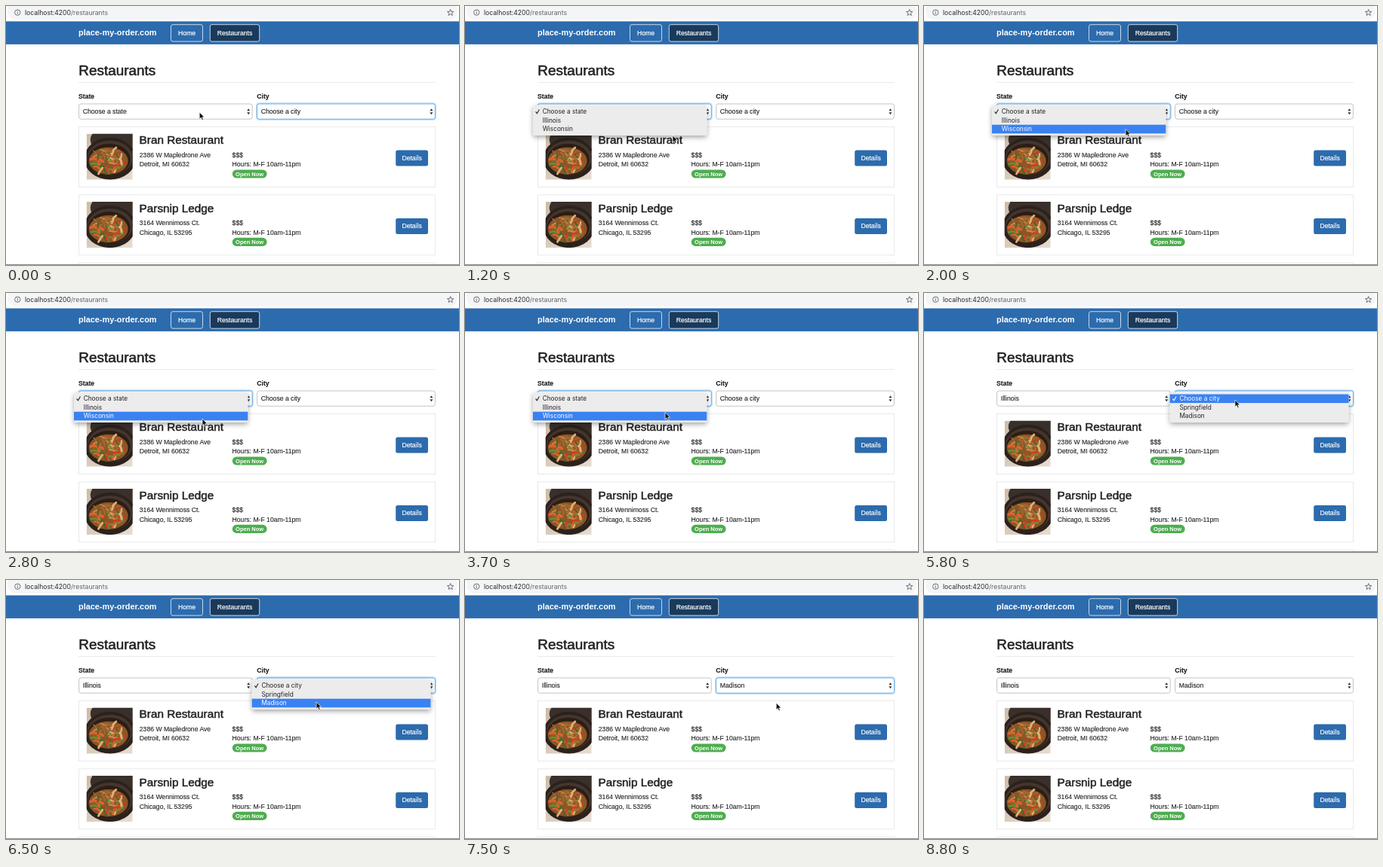
Recreate the animation shown at these times as an HTML page. Size 600x344 px, loop 8900 ms.

```html
<!DOCTYPE html>
<html lang="en">
<head>
<meta charset="utf-8">
<title>Restaurants</title>
<style>
  html, body { margin: 0; width: 100%; height: 100%; overflow: hidden; background: #fff; }
  svg { display: block; width: 100vw; height: 100vh; }
  text { font: 8.65px "Liberation Sans", Arial, sans-serif; fill: #222; stroke: #222; stroke-width: .12px; white-space: pre; }
  .ui { font: 8.25px Inter, sans-serif; stroke: none; }
  .url { font: 8.62px Inter, sans-serif; fill: #5f6368; stroke: none; }
  .host { fill: #26282b; }
  .bold { font-weight: 700; fill: #1c1c1c; }
  .brand { font-size: 10.9px; font-weight: 700; fill: #fff; stroke: none; }
  .title { font-size: 18.9px; stroke-width: .55px; }
  .name { font-size: 15.3px; stroke-width: .5px; }
  .btn { fill: #fff; stroke: #fff; stroke-width: .2px; text-anchor: middle; }
  .badge { font-size: 7.5px; font-weight: 700; fill: #fff; stroke: none; text-anchor: middle; }
</style>
</head>
<body>
<svg id="stage" viewBox="0 0 600 344" preserveAspectRatio="none">
  <defs>
    <linearGradient id="table" x1="0" y1="0" x2="1" y2="1">
      <stop offset="0" stop-color="#cdbba6"/><stop offset="1" stop-color="#e6dcd0"/>
    </linearGradient>
    <filter id="shadow" x="-10%" y="-30%" width="120%" height="180%">
      <feDropShadow dx="0" dy="2.5" stdDeviation="3.4" flood-color="#000" flood-opacity=".35"/>
    </filter>
    <clipPath id="crop"><rect width="61" height="61"/></clipPath>
    <g id="dish" clip-path="url(#crop)"></g>
  </defs>
</svg>
<script>
const NS = 'http://www.w3.org/2000/svg';
const stage = document.getElementById('stage');
const LOOP = 8900;

function add(parent, tag, attrs = {}, label) {
  const el = document.createElementNS(NS, tag);
  for (const k in attrs) el.setAttribute(k, attrs[k]);
  if (label !== undefined) el.textContent = label;
  return parent.appendChild(el);
}
const text = (parent, x, y, label, cls = '') => add(parent, 'text', { x, y, class: cls }, label);
const rect = (parent, x, y, width, height, fill, more) =>
  add(parent, 'rect', { x, y, width, height, fill, ...more });
const show = (el, on) => el.setAttribute('visibility', on ? 'visible' : 'hidden');

function drawDish() {
  const g = document.getElementById('dish');
  let seed = 11;
  const rnd = (a, b) => {
    seed = (seed * 16807) % 2147483647;
    return a + (b - a) * seed / 2147483647;
  };
  const oval = (cx, cy, rx, ry, fill) => add(g, 'ellipse', { cx, cy, rx, ry, fill });
  rect(g, 0, 0, 61, 61, 'url(#table)');
  oval(38, 8, 33, 20, '#3a302b');
  oval(31, 33, 34, 28, '#2b211d');
  oval(31, 32, 30, 23, '#44362e');
  oval(30, 34, 28, 21, '#2c1d15');
  oval(29, 36, 26, 18, '#8a5628');
  const hues = ['#c98742', '#e0b072', '#6f8a34', '#d63a20', '#a5642f', '#4a6426', '#e2602f', '#9c6a36'];
  for (let i = 0; i < 64; i++) {
    const a = rnd(0, 6.28), r = Math.sqrt(rnd(0, 1)), d = rnd(0, 3.14), l = rnd(2, 5);
    const x = 29 + 23 * r * Math.cos(a), y = 36 + 15 * r * Math.sin(a);
    add(g, 'path', {
      d: `M${x - l * Math.cos(d)} ${y - l * Math.sin(d)}Q${x + 1} ${y - 2} ${x + l * Math.cos(d)} ${y + l * Math.sin(d)}`,
      stroke: hues[i % hues.length], 'stroke-width': rnd(1.4, 3.2), 'stroke-linecap': 'round', fill: 'none'
    });
  }
}

function drawChrome() {
  rect(stage, 0, 0, 600, 344, '#fff');
  rect(stage, 2, -6, 596, 24, '#f4f5f6', { rx: 11 });
  add(stage, 'circle', { cx: 15.3, cy: 8.6, r: 3.7, fill: 'none', stroke: '#5f6368', 'stroke-width': .9 });
  add(stage, 'path', { d: 'M15.3 8.2v2.4M15.3 6.3v1', stroke: '#5f6368', 'stroke-width': 1 });
  const url = text(stage, 25, 11.6, '', 'url');
  add(url, 'tspan', { class: 'host' }, 'localhost:4200');
  add(url, 'tspan', {}, '/restaurants');
  let star = '';
  for (let i = 0; i < 10; i++) {
    const a = i * Math.PI / 5, r = i % 2 ? 1.9 : 4.4;
    star += `${588.7 + r * Math.sin(a)},${8.9 - r * Math.cos(a)} `;
  }
  add(stage, 'polygon', { points: star, fill: 'none', stroke: '#5f6368', 'stroke-width': .9 });

  rect(stage, 0, 20.4, 600, 30.5, '#2c6bad');
  text(stage, 96, 38.6, 'place-my-order.com', 'brand');
  const edge = { rx: 2.5, stroke: '#dbe6f1', 'stroke-width': .9 };
  rect(stage, 218.5, 24.7, 42, 22.4, '#2c6bad', edge);
  rect(stage, 270.3, 24.7, 65.4, 22.4, '#1a3a5c', edge);
  text(stage, 239.5, 38.8, 'Home', 'btn');
  text(stage, 303, 38.8, 'Restaurants', 'btn');

  text(stage, 96.3, 92.4, 'Restaurants', 'title');
  rect(stage, 96, 101, 473, .8, '#e6e6e6');
  text(stage, 96, 123.4, 'State', 'bold');
  text(stage, 332.3, 123.4, 'City', 'bold');
}

function drawCard(y, name, street, city) {
  const g = add(stage, 'g', { transform: `translate(0 ${y})` });
  rect(g, 96.5, .4, 472, 80, '#fff', { stroke: '#e7e7e7', 'stroke-width': .9 });
  if (!name) return;
  add(g, 'use', { href: '#dish', x: 106.7, y: 9.7 });
  text(g, 176.6, 23.3, name, 'name');
  text(g, 176.8, 41, street);
  text(g, 176.8, 53.2, city);
  text(g, 299.6, 41, '$$$');
  text(g, 299.6, 53.2, 'Hours: M-F 10am-11pm');
  rect(g, 299.8, 57.4, 45.8, 11.2, '#4fad50', { rx: 5.6 });
  text(g, 322.6, 65.7, 'Open Now', 'badge');
  rect(g, 516.2, 31.6, 42.8, 21, '#2c6bad', { rx: 2.5 });
  text(g, 537.6, 45.1, 'Details', 'btn');
}

function makeSelect(x, width) {
  const glow = rect(stage, x - .8, 129.2, width + 1.6, 21.8, 'none',
    { rx: 3.4, stroke: '#66afe9', 'stroke-opacity': .4, 'stroke-width': 1.8 });
  const box = rect(stage, x, 130, width, 20.2, '#fff', { rx: 2.8, 'stroke-width': 1 });
  const label = text(stage, x + 5.2, 143.2, '');
  const ax = x + width - 5;
  add(stage, 'path', { d: `M${ax - 2} 139.2l2 -3 2 3zM${ax - 2} 141.2l2 3 2 -3z`, fill: '#333' });
  return (value, focused) => {
    label.textContent = value;
    show(glow, focused);
    box.setAttribute('stroke', focused ? '#66afe9' : '#c4c4c4');
  };
}

const ROW = 11.6, TOP = 134.5;

function makeMenu(x, width, items) {
  const g = add(stage, 'g');
  rect(g, x, 131.7, width, 40.2, '#ececec', { rx: 2.8, filter: 'url(#shadow)' });
  const bar = rect(g, x, TOP, width, ROW, '#3a82f2');
  const tick = add(g, 'path', {
    d: `M${x + 3.6} 140.4l1.8 2.4 3 -5.2`, fill: 'none', 'stroke-width': 1.1
  });
  const labels = items.map((s, i) => text(g, x + 12.7, 143.2 + i * ROW, s, 'ui'));
  return (opacity, y) => {
    show(g, opacity > 0);
    g.setAttribute('opacity', opacity);
    const row = Math.floor((y - TOP) / ROW);
    const on = row >= 0 && row < items.length;
    bar.setAttribute('opacity', on ? 1 : 0);
    bar.setAttribute('y', TOP + row * ROW);
    tick.setAttribute('stroke', row === 0 ? '#fff' : '#222');
    labels.forEach((el, i) => { el.style.fill = i === row ? '#fff' : '#222'; });
  };
}

drawDish();
drawChrome();
drawCard(160, 'Bran Restaurant', '2386 W Mapledrone Ave', 'Detroit, MI 60632');
drawCard(250.4, 'Parsnip Ledge', '3164 Wennimoss Ct.', 'Chicago, IL 53295');
drawCard(340.8);
rect(stage, 0, 343, 600, 1, '#8a8a8a');
const stateBox = makeSelect(96.6, 229.6);
const cityBox = makeSelect(332.6, 235.8);
const stateMenu = makeMenu(90, 230.3, ['Choose a state', 'Illinois', 'Wisconsin']);
const cityMenu = makeMenu(325.7, 236.8, ['Choose a city', 'Springfield', 'Madison']);
const cursor = add(stage, 'path', {
  d: 'M0 0V9.2L2.1 7.3 3.6 10.6 5.2 9.9 3.8 6.7H6.6Z',
  fill: '#111', stroke: '#fff', 'stroke-width': .7
});

// time, x, y of the pointer
const path = [
  [0, 256.2, 141], [500, 256.2, 141], [1200, 275, 172], [1700, 272, 171], [2300, 262, 156],
  [2800, 260, 167], [3400, 262, 165], [4000, 268, 152], [4600, 268, 152], [5300, 411, 142],
  [5900, 412, 142], [6400, 411, 162], [7100, 411, 162], [7800, 413, 164], [LOOP, 413, 164]
];

function pointer(t) {
  const i = path.findIndex(p => p[0] > t);
  const [t0, x0, y0] = path[i - 1], [t1, x1, y1] = path[i];
  const u = (t - t0) / (t1 - t0), e = u * u * (3 - 2 * u);
  return [x0 + (x1 - x0) * e, y0 + (y1 - y0) * e];
}

// open at once, fade out over 200 ms
const menuOpacity = (t, open, close) =>
  t < open ? 0 : Math.max(0, Math.min(1, 1 - (t - close) / 200));

function render(time) {
  const t = Math.floor(time % LOOP / 100) * 100;
  const [x, y] = pointer(t);
  cursor.setAttribute('transform', `translate(${x} ${y})`);
  show(cursor, t < 8200);
  stateBox(t < 4600 ? 'Choose a state' : 'Illinois', t >= 500 && t < 5500);
  cityBox(t < 7000 ? 'Choose a city' : 'Madison', t < 500 || (t >= 5500 && t < 8200));
  stateMenu(menuOpacity(t, 500, 4400), y);
  cityMenu(menuOpacity(t, 5500, 6800), y);
}

const start = performance.now();
function tick() {
  render(performance.now() - start);
  requestAnimationFrame(tick);
}
tick();
</script>
</body>
</html>
```
